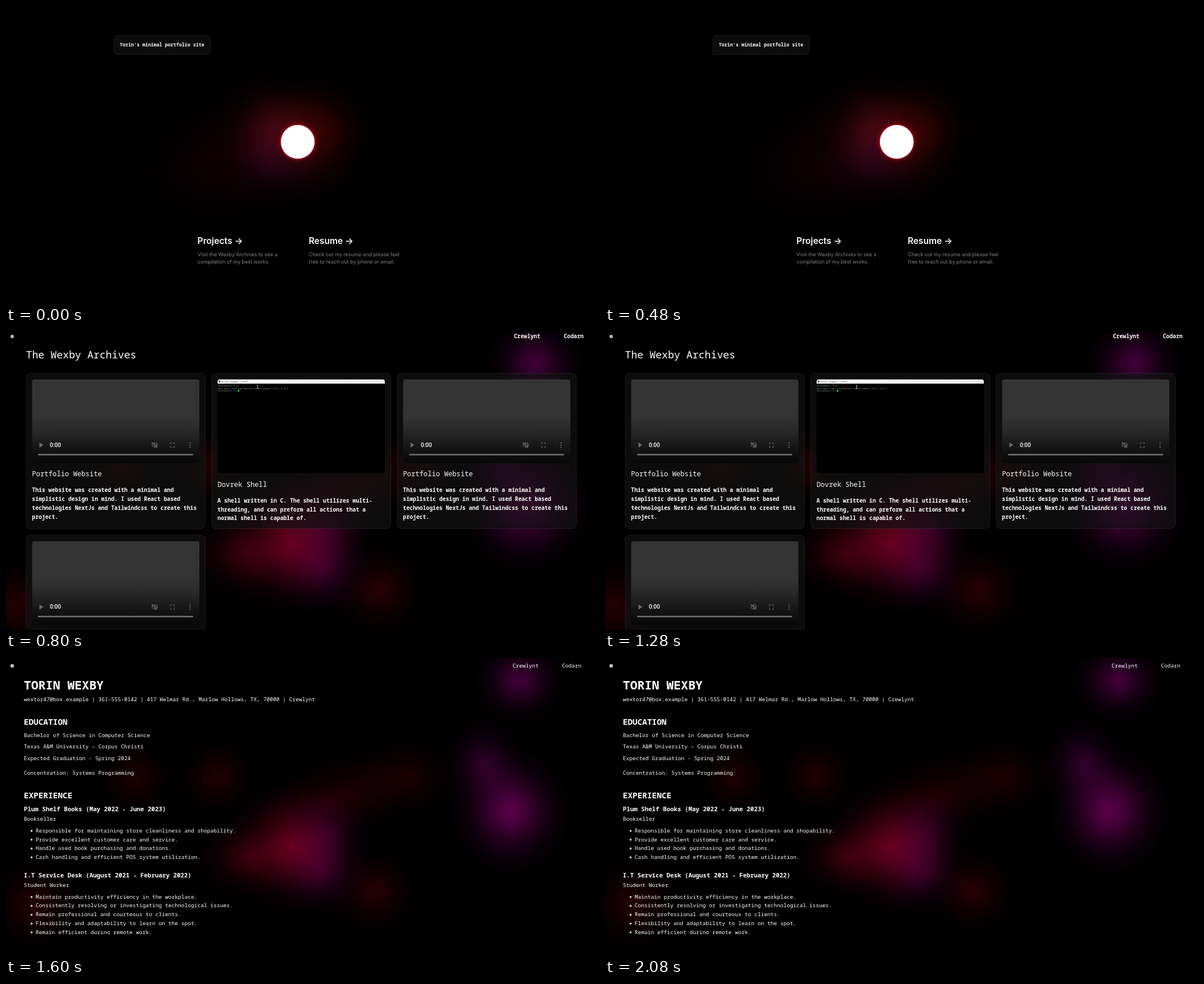
An HTML page that plays this animation: 1055 px wide and 531 px high, repeating every 2400 ms.

```html
<!DOCTYPE html>
<html lang="en">
<head>
<meta charset="utf-8">
<title>Portfolio</title>
<style>
html, body { margin: 0; width: 100%; height: 100%; overflow: hidden; background: #000; }
svg { display: block; width: 1055px; height: 531px; }
text { font-family: "Noto Sans Mono", monospace; font-weight: 500; fill: #fff; }

.scene { animation: show 2400ms step-end infinite; }
.archive { animation-delay: -1600ms; }
.resume { animation-delay: -800ms; }
@keyframes show {
  0% { visibility: visible; }
  33.3333%, 100% { visibility: hidden; }
}

.blob { mix-blend-mode: screen; }
.mark { fill: #fff; filter: drop-shadow(0 0 2px #e01424) drop-shadow(0 0 6px #80060e); }
.small-mark { fill: #bbb; }

.badge { font-size: 8.36px; font-weight: 600; }
.link { font: 600 15.65px Inter, sans-serif; }
.note { font: 400 9.06px Inter, sans-serif; fill: #808080; }

.title { font-size: 18.2px; }
.card { fill: rgba(19, 19, 19, .64); stroke: rgba(255, 255, 255, .09); }
.card-title { font-size: 12.2px; }
.copy text, .archive .nav { font-size: 9.77px; font-weight: 600; }
.clock { font: 500 10px Roboto, sans-serif; }
.tiny { font-size: 3.6px; fill: #8c9a8c; }

.resume .nav { font-size: 9.68px; }
.name { font-size: 21.5px; font-weight: 700; }
.section { font-size: 14.4px; font-weight: 700; }
.job { font-size: 10.8px; font-weight: 700; }
.line { font-size: 9.6px; }
</style>
</head>
<body>
<svg viewBox="0 0 1055 531">
  <defs>
    <linearGradient id="screen" x2="0" y2="1">
      <stop offset="0" stop-color="#343434"/>
      <stop offset=".46" stop-color="#333"/>
      <stop offset=".62" stop-color="#282828"/>
      <stop offset=".8" stop-color="#171717"/>
      <stop offset="1" stop-color="#070707"/>
    </linearGradient>
    <linearGradient id="bar">
      <stop offset="0" stop-color="#fff"/>
      <stop offset="1" stop-color="#e6e8ea"/>
    </linearGradient>
    <clipPath id="shot"><rect x="376.5" y="84.5" width="297.5" height="167" rx="4"/></clipPath>
    <clipPath id="page"><rect width="1055" height="492"/></clipPath>

    <g id="player">
      <rect x="46.5" y="84.5" width="297.5" height="149" rx="4" fill="url(#screen)"/>
      <path d="M59.5 197v9l7-4.5z" fill="#6c6c6c"/>
      <text class="clock" x="78" y="204.7">0:00</text>
      <g fill="none" stroke="#606060" stroke-width="1.1">
        <path d="M260 199.5h2l3-2.5v9l-3-2.5h-2zM267 199q2 2.5 0 5M267 197q5 4.5 0 9"/>
        <path d="M259.5 196.5l9 9.5" stroke="#777"/>
        <path d="M292.5 200v-2.5h2.500M297 197.5h2.5v2.5M299.5 203v2.5h-2.5M295 205.5h-2.5v-2.5"/>
      </g>
      <g fill="#777">
        <circle cx="327.5" cy="197.5" r="1.1"/>
        <circle cx="327.5" cy="201.5" r="1.1"/>
        <circle cx="327.5" cy="205.5" r="1.1"/>
        <rect x="57" y="217.3" width="276" height="2.4" rx="1.2"/>
      </g>
    </g>

    <g id="site-card">
      <rect class="card" x="36" y="73.5" width="318.5" height="277" rx="7.5"/>
      <use href="#player"/>
      <text class="card-title" x="46.3" y="257.3">Portfolio Website</text>
      <g class="copy">
        <text x="46.3" y="285.2">This website was created with a minimal and</text>
        <text x="46.3" y="301">simplistic design in mind. I used React based</text>
        <text x="46.3" y="316.8">technologies NextJs and Tailwindcss to create this</text>
        <text x="46.3" y="332.6">project.</text>
      </g>
    </g>
    <g id="lights"></g>
  </defs>

  <rect width="1055" height="531"/>

  <g class="scene">
    <g id="glow"></g>
    <rect x="192" y="52.3" width="171.5" height="34.3" rx="7" fill="#0c0c0c" stroke="#1c1c1c"/>
    <text class="badge" x="202.6" y="72.3">Torin's minimal portfolio site</text>
    <circle class="mark" cx="519" cy="242" r="30"/>
    <text class="link" x="340.6" y="424">Projects →</text>
    <text class="note" x="340.8" y="446.3">Visit the Wexby Archives to see a</text>
    <text class="note" x="340.8" y="459">compilation of my best works.</text>
    <text class="link" x="538.6" y="424">Resume →</text>
    <text class="note" x="538.8" y="446.3">Check out my resume and please feel</text>
    <text class="note" x="538.8" y="459">free to reach out by phone or email.</text>
  </g>

  <g class="scene archive">
    <use href="#lights" transform="translate(-40 12) scale(1.075 1.08)"/>
    <circle class="small-mark" cx="11" cy="8" r="3"/>
    <text class="nav" x="903.7" y="10.8">Crewlynt</text>
    <text class="nav" x="992.5" y="10.8">Codarn</text>
    <text class="title" x="35.5" y="46.8">The Wexby Archives</text>

    <use href="#site-card"/>
    <use href="#site-card" x="660"/>
    <rect class="card" x="36" y="362" width="318.5" height="277" rx="7.5"/>
    <use href="#player" y="288.5"/>

    <rect class="card" x="366" y="73.5" width="318.5" height="277" rx="7.5"/>
    <g clip-path="url(#shot)">
      <rect x="376" y="84" width="299" height="168"/>
      <rect x="376" y="84" width="299" height="8" fill="url(#bar)"/>
      <rect x="378.5" y="86.5" width="3" height="3.5" fill="#555"/>
      <text class="tiny" x="383" y="89.7" style="fill:#333">dovrek.example - PuTTY</text>
      <text class="tiny" x="377" y="97.2">DovrekShell:~$ ls</text>
      <text class="tiny" x="377" y="101.6">main  main.c  main.cpp  Makefile  output  readme  title.c  util.h</text>
      <text class="tiny" x="377" y="106.3">DovrekShell:~$</text>
      <rect x="412.3" y="102.5" width="2.5" height="4.5" fill="#21c045"/>
      <path d="M446.5 95.5h2.5M447.7 95.5v5M446.5 100.5h2.5" stroke="#ddd" stroke-width=".8"/>
    </g>
    <text class="card-title" x="376.5" y="276">Dovrek Shell</text>
    <g class="copy">
      <text x="376.3" y="303.7">A shell written in C. The shell utilizes multi-</text>
      <text x="376.3" y="319.5">threading, and can preform all actions that a</text>
      <text x="376.3" y="335.3">normal shell is capable of.</text>
    </g>
  </g>

  <g class="scene resume">
    <use href="#lights"/>
    <circle class="small-mark" cx="11" cy="14" r="3.2"/>
    <text class="nav" x="901.3" y="17.2">Crewlynt</text>
    <text class="nav" x="989" y="17.2">Codarn</text>
    <g id="cv" clip-path="url(#page)"></g>
  </g>
</svg>

<script>
const SVG = "http://www.w3.org/2000/svg";
const byId = id => document.getElementById(id);

function add(parent, tag, attrs, text = "") {
  const node = document.createElementNS(SVG, tag);
  for (const key in attrs) node.setAttribute(key, attrs[key]);
  node.textContent = text;
  return parent.appendChild(node);
}

// Soft light with a bell-shaped falloff.
const falloff = [1, .7, .34, .1, 0];
let blobCount = 0;
function blob(parent, cx, cy, rx, ry, color, angle = 0) {
  const id = "blob" + blobCount++;
  const gradient = add(parent, "radialGradient", { id });
  falloff.forEach((alpha, i) =>
    add(gradient, "stop", { offset: i / 4, "stop-color": color, "stop-opacity": alpha }));
  add(parent, "ellipse", {
    class: "blob", cx, cy, rx, ry, fill: `url(#${id})`, transform: `rotate(${angle} ${cx} ${cy})`
  });
}

const glow = byId("glow");
blob(glow, 430, 258, 240, 140, "#110002", -20);
blob(glow, 470, 225, 95, 110, "#2a050c");
blob(glow, 562, 224, 95, 100, "#290200");
blob(glow, 510, 215, 100, 90, "#220306");
blob(glow, 470, 275, 90, 85, "#0d020e");
blob(glow, 530, 285, 100, 80, "#120206");

const lights = byId("lights");
blob(lights, 510, 335, 120, 120, "#64001c");
blob(lights, 430, 355, 100, 75, "#30000c");
blob(lights, 570, 315, 85, 90, "#22001c");
blob(lights, 560, 380, 85, 80, "#2a0022");
blob(lights, 600, 245, 160, 80, "#1e0004", -15);
blob(lights, 712, 212, 95, 75, "#180003");
blob(lights, 655, 415, 85, 80, "#260006");
blob(lights, 375, 211, 72, 72, "#220003");
blob(lights, 230, 213, 72, 72, "#1e0002");
blob(lights, 50, 440, 90, 85, "#240004");
blob(lights, 897, 272, 110, 115, "#5c004c");
blob(lights, 850, 188, 78, 86, "#2c0028");
blob(lights, 913, 40, 84, 78, "#42003a");

const cv = byId("cv");
const write = (style, y, text, x = 31.8) => add(cv, "text", { class: style, x, y }, text);

function bullets(y, items) {
  items.forEach((item, i) => {
    const base = y + i * 15.75;
    add(cv, "circle", { cx: 45.5, cy: base - 2.8, r: 1.7, fill: "#fff" });
    write("line", base, item, 52.7);
  });
}

write("name", 55.5, "TORIN WEXBY");
write("line", 77.3, "wextor47@box.example | 361-555-0142 | 417 Welmar Rd., Marlow Hollows, TX, 70000 | Crewlynt");
write("section", 119, "EDUCATION");
write("line", 140.5, "Bachelor of Science in Computer Science");
write("line", 161.4, "Texas A&M University – Corpus Christi");
write("line", 182.2, "Expected Graduation - Spring 2024");
write("line", 208.3, "Concentration: Systems Programming");
write("section", 249.7, "EXPERIENCE");
write("job", 272.8, "Plum Shelf Books (May 2022 - June 2023)");
write("line", 290, "Bookseller");
bullets(310.8, [
  "Responsible for maintaining store cleanliness and shopability.",
  "Provide excellent customer care and service.",
  "Handle used book purchasing and donations.",
  "Cash handling and efficient POS system utilization."
]);
write("job", 391, "I.T Service Desk (August 2021 - February 2022)");
write("line", 407.9, "Student Worker");
bullets(428.7, [
  "Maintain productivity efficiency in the workplace.",
  "Consistently resolving or investigating technological issues.",
  "Remain professional and courteous to clients.",
  "Flexibility and adaptability to learn on the spot.",
  "Remain efficient during remote work."
]);
</script>
</body>
</html>
```
